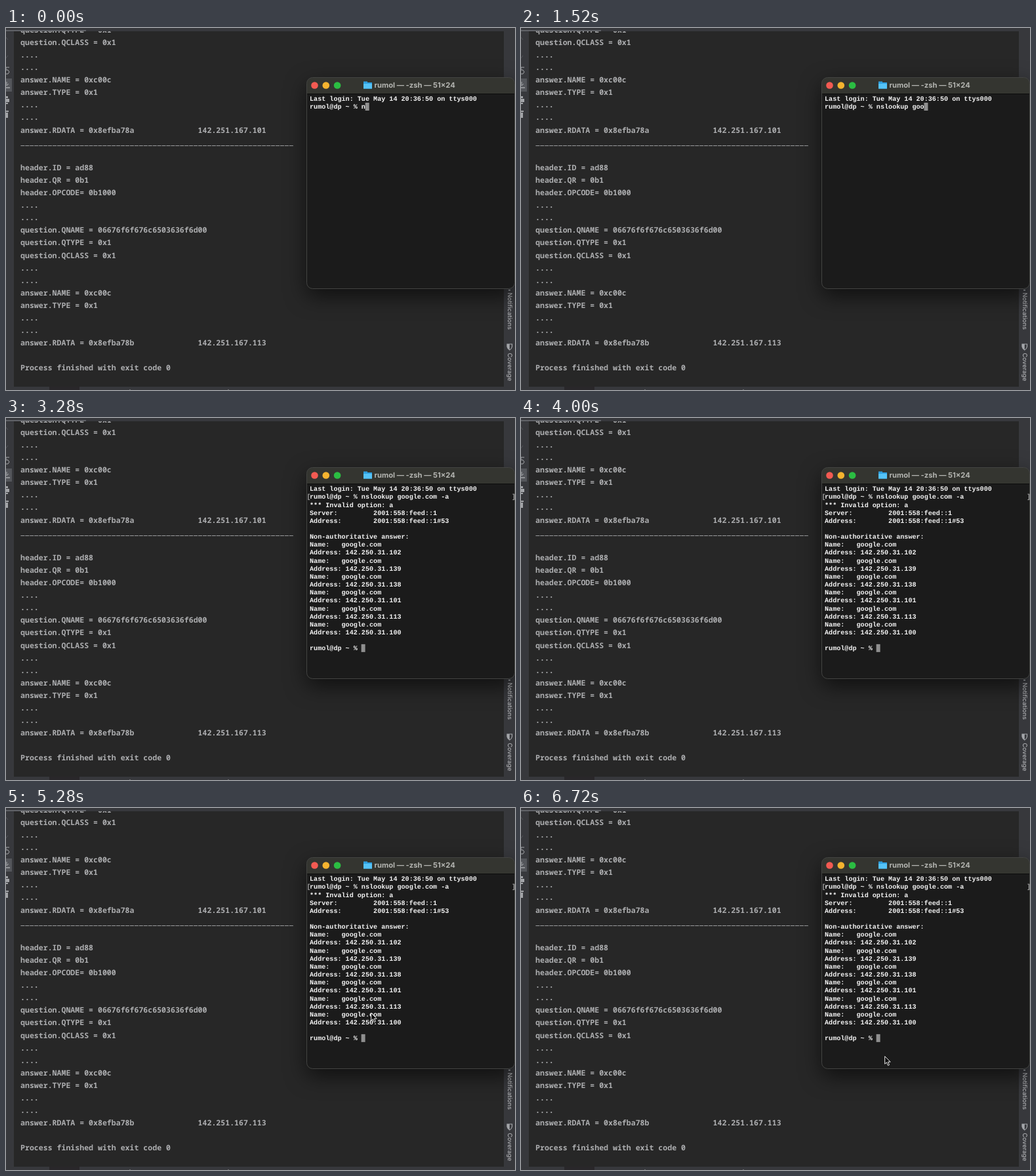
Animation, 776 px wide and 552 px high, one loop 6.8 s. Source, as an HTML page with a canvas:

```html
<!DOCTYPE html>
<html lang="en">
<head>
<meta charset="utf-8">
<title>DNS lookup in a terminal</title>
<style>
html, body { margin: 0; width: 100%; height: 100%; overflow: hidden; background: #272727; }
canvas { display: block; }
</style>
</head>
<body>
<canvas id="stage" width="776" height="552"></canvas>
<script>
const ctx = document.getElementById('stage').getContext('2d');
ctx.textRendering = 'geometricPrecision';

const LOOP = 6800, STEP = 80;
const CODE_FONT = '600 11.57px "Noto Sans Mono", monospace';
const TERM_FONT = 'bold 10.12px "Liberation Mono", monospace';
const CELL = 6.07, ROW = 12.155, TERM_X = 463, TERM_Y = 111.2;

const USER = 'rumol';
const PROMPT = USER + '@dp ~ % ';
const COMMAND = 'nslookup google.com -a';
// Time at which each character of COMMAND is on screen
const KEY_TIMES = [0, 160, 320, 480, 640, 800, 880, 1040, 1120, 1280, 1360,
  1520, 1600, 1680, 1840, 1920, 2080, 2160, 2320, 2560, 2800, 2880];
const ENTER = 3120, REPLY = 3200, POINTER_SHOWN = 4320;
const POINTER_PATH = [[4320, 519, 329], [4880, 519, 328], [5280, 556, 312], [5600, 591, 288],
  [5920, 606, 268], [6080, 607, 268], [6320, 590, 308], [6640, 554, 378], [6800, 554, 378]];

const record = (id, last) => ['header.ID = ' + id, 'header.QR = 0b1', 'header.OPCODE= 0b1000', '....', '....',
  'question.QNAME = 06676f6f676c6503636f6d00', 'question.QTYPE = 0x1', 'question.QCLASS = 0x1',
  '....', '....', 'answer.NAME = 0xc00c', 'answer.TYPE = 0x1', '....', '....',
  'answer.RDATA = 0x8efba78' + (last === 101 ? 'a' : 'b') + ' '.repeat(14) + '142.251.167.' + last];
const CODE_LINES = [...record('ad88', 101).slice(6), '', '', ...record('ad88', 113), '',
  'Process finished with exit code 0'];

const REPLY_LINES = ['Server:         2001:558:feed::1', 'Address:        2001:558:feed::1#53', '',
  'Non-authoritative answer:',
  ...[102, 139, 138, 101, 113, 100].flatMap(n => ['Name:   google.com', 'Address: 142.250.31.' + n]),
  ''];

function rect(x, y, w, h, color) {
  ctx.fillStyle = color;
  ctx.fillRect(x, y, w, h);
}

function text(str, x, y, font, color) {
  ctx.font = font;
  ctx.fillStyle = color;
  ctx.fillText(str, x, y);
}

function line(points, color, width = 1) {
  ctx.strokeStyle = color;
  ctx.lineWidth = width;
  ctx.beginPath();
  points.forEach(([x, y]) => ctx.lineTo(x, y));
  ctx.stroke();
}

function disc(x, y, r, color) {
  ctx.fillStyle = color;
  ctx.beginPath();
  ctx.arc(x, y, r, 0, 2 * Math.PI);
  ctx.fill();
}

function sideLabel(str, y) {
  ctx.save();
  ctx.translate(764.5, y);
  ctx.rotate(Math.PI / 2);
  text(str, 0, 0, '500 9.3px Inter, sans-serif', '#acadb0');
  ctx.restore();
}

function drawEditor() {
  rect(0, 0, 776, 552, '#37383c');
  rect(12, 5, 747, 542, '#272727');
  rect(0, 3, 122, 2, '#606267');
  rect(66, 547, 46, 5, '#29272a');
  for (const x of [188, 338]) rect(x, 551, 2, 1, '#6c6d71');

  ctx.save();
  ctx.beginPath();
  ctx.rect(12, 5, 747, 542);
  ctx.clip();
  CODE_LINES.forEach((str, i) => text(str, 22, 25.8 + (i - 1) * 19.1, CODE_FONT, '#adaeb0'));
  ctx.setLineDash([6, 0.94]);
  line([[22.4, 179.5], [438, 179.5]], '#9a9b9d');
  ctx.restore();
}

function drawSidebars() {
  const icon = '#a4a6aa';
  line([[0, 14], [3, 18]], '#505257');
  line([[3, 42], [0, 46]], '#505257');
  line([[5, 60], [0, 60], [0, 64], [3, 64], [5, 67], [3, 70], [0, 70]], icon);
  rect(0, 77, 9, 20, '#54565b');
  line([[0, 91], [6, 91]], icon, 1.5);
  line([[1, 82], [1, 88], [4, 85]], icon);
  rect(0, 104, 3, 3, icon);
  rect(0, 108, 5, 5, icon);
  rect(0, 114, 3, 2, icon);
  rect(0, 126, 4, 2, icon);
  rect(0, 129, 3, 8, icon);

  rect(766, 399, 3, 1.5, icon);
  sideLabel('Notifications', 403.5);
  sideLabel('Coverage', 495.5);
  const shield = new Path2D('M764 482h7.5v4q-.5 3-3.75 5q-3.25-2-3.75-5z');
  ctx.strokeStyle = icon;
  ctx.lineWidth = 1.2;
  ctx.stroke(shield);
  ctx.fillStyle = icon;
  ctx.fill(new Path2D('M764 482h3.75v9q-3.25-2-3.75-5z'));
}

function drawWindow() {
  const frame = new Path2D();
  frame.roundRect(458.5, 75.5, 317, 322, 9);
  ctx.save();
  ctx.shadowColor = 'rgba(0, 0, 0, .6)';
  ctx.shadowBlur = 32;
  ctx.shadowOffsetY = 11;
  ctx.fillStyle = '#1b1b1b';
  ctx.fill(frame);
  ctx.restore();

  ctx.save();
  ctx.clip(frame);
  rect(458, 75, 318, 25, '#343530');
  rect(458, 100, 318, 1, '#0c0c0c');
  ctx.restore();
  ctx.strokeStyle = '#434442';
  ctx.lineWidth = 1;
  ctx.stroke(frame);

  ['#f35a52', '#f5b32f', '#2bbd42'].forEach((color, i) => disc(470.5 + i * 17.3, 87.5, 5.3, color));
  rect(545, 81.5, 6, 3, '#2e9fe0');
  rect(545, 83, 13, 9.5, '#2e9fe0');
  rect(545, 85, 13, 7.5, '#55c3f7');
  text(USER + ' — -zsh — 51×24', 561.5, 91, 'bold 11.2px Inter, sans-serif', '#b4b5b1');
}

function drawSession(t) {
  const typed = KEY_TIMES.filter(time => time <= t).length;
  const lines = ['Last login: Tue May 14 20:36:50 on ttys000', PROMPT + COMMAND.slice(0, typed)];
  if (t >= ENTER) {
    lines.push('*** Invalid option: a');
    if (t >= REPLY) lines.push(...REPLY_LINES, PROMPT);
    else lines.push('');
    const y = TERM_Y + ROW;
    text('[', 458.5, y, TERM_FONT, '#a5a5a5');
    text(']', 771, y, TERM_FONT, '#a5a5a5');
  }
  lines.forEach((str, row) => text(str, TERM_X, TERM_Y + row * ROW, TERM_FONT, '#f4f4f4'));
  const row = lines.length - 1;
  rect(TERM_X + lines[row].length * CELL - 0.3, 101.8 + row * ROW, 6, 12, '#8f8f8f');
}

function pointerAt(t) {
  const i = POINTER_PATH.findIndex(([time]) => time > t);
  const [t0, x0, y0] = POINTER_PATH[i - 1], [t1, x1, y1] = POINTER_PATH[i];
  const k = (t - t0) / (t1 - t0);
  return [x0 + (x1 - x0) * k, y0 + (y1 - y0) * k];
}

const arrow = new Path2D('M.7 .7v11.6l2.7-2.5l2.1 4.8l2-.9l-2.1-4.6h3.8z');

function drawPointer(t) {
  if (t < POINTER_SHOWN) return;
  ctx.save();
  ctx.translate(...pointerAt(t));
  ctx.fillStyle = '#080808';
  ctx.fill(arrow);
  ctx.strokeStyle = '#eee';
  ctx.lineWidth = 1;
  ctx.stroke(arrow);
  ctx.restore();
}

const start = performance.now();

function draw() {
  const elapsed = (performance.now() - start) % LOOP;
  const t = Math.floor(elapsed / STEP) * STEP;
  drawEditor();
  drawSidebars();
  drawWindow();
  drawSession(t);
  drawPointer(t);
  requestAnimationFrame(draw);
}
draw();
</script>
</body>
</html>
```
